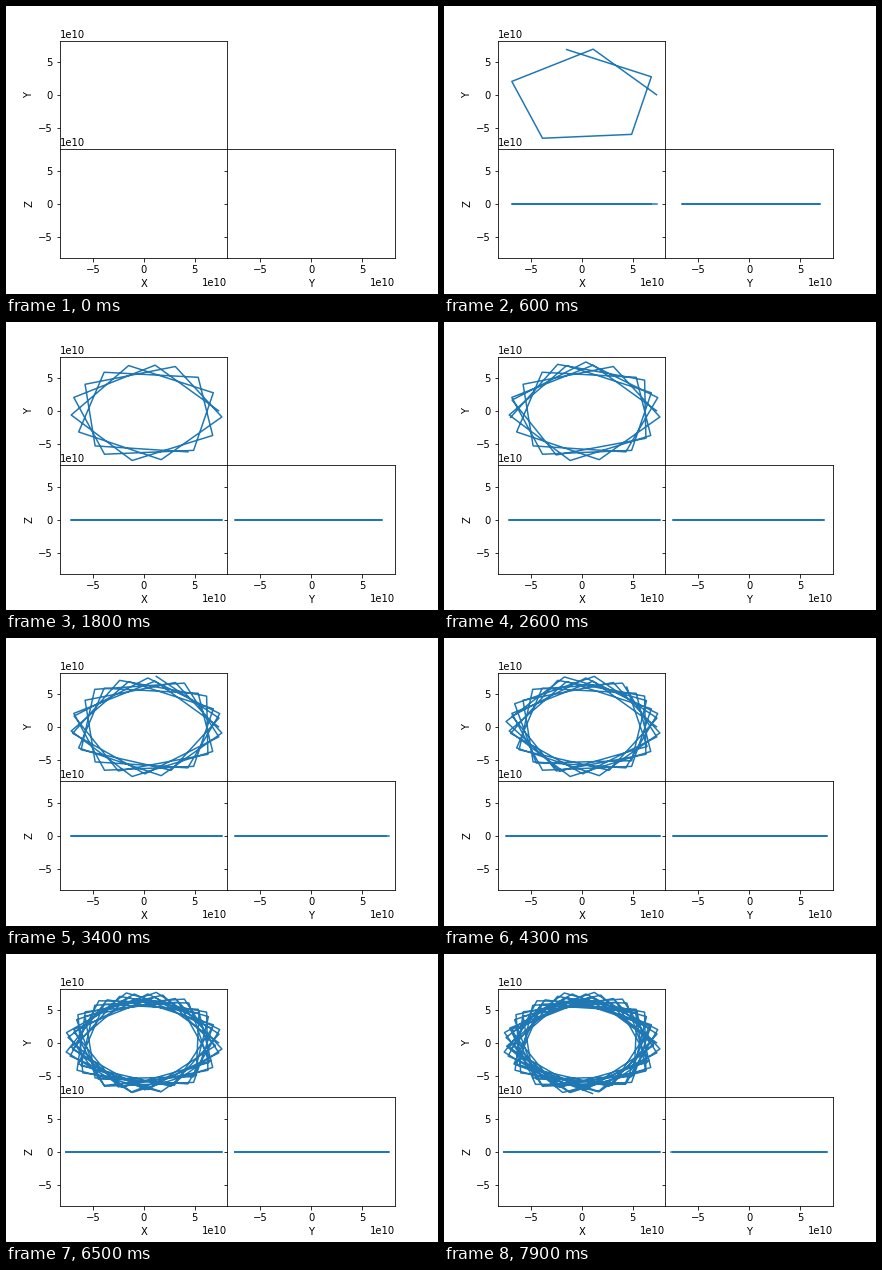
Recreate the animation shown at these times as a matplotlib script. Size 432 by 288 pixels, loop 8 s.

```python
import numpy as np
import matplotlib.pyplot as plt
from matplotlib.animation import FuncAnimation

STEPS = 80
LIMIT = 8.228e10

plt.rcParams.update({
    "font.family": "DejaVu Sans",
    "font.size": 10,
    "lines.linewidth": 1.5,
    "axes.linewidth": 0.8,
})


def orbit(steps):
    """Sampled, slowly precessing, nearly circular orbit in the XY plane."""
    radius, ecc = 0.8965 * LIMIT, 0.0505
    n = np.arange(steps)
    start = np.radians(-87)
    anomaly = start + np.radians(71.51) * n
    angle = (np.radians(0.2 + 76.331 * n)
             + 2 * ecc * (np.sin(anomaly) - np.sin(start)))
    r = radius * (1 - ecc * np.cos(anomaly))
    return r * np.cos(angle), r * np.sin(angle), np.zeros(steps)


x, y, z = orbit(STEPS)

fig, axes = plt.subplots(2, 2, sharex="col", sharey="row",
                         figsize=(6, 4), dpi=72, facecolor="white")
fig.subplots_adjust(left=0.125, right=0.9, bottom=0.125, top=0.88,
                    wspace=0, hspace=0)
axes[0, 1].remove()
ax_xy, ax_xz, ax_yz = axes[0, 0], axes[1, 0], axes[1, 1]

ax_xy.set_ylabel("Y")
ax_xz.set(xlabel="X", ylabel="Z")
ax_yz.set_xlabel("Y")

ticks = [-5e10, 0, 5e10]
views = []
for ax, u, v in ((ax_xy, x, y), (ax_xz, x, z), (ax_yz, y, z)):
    ax.set(xticks=ticks, yticks=ticks,
           xlim=(-LIMIT, LIMIT), ylim=(-LIMIT, LIMIT))
    line, = ax.plot([], [], color="C0")
    views.append((line, u, v))


def update(i):
    for line, u, v in views:
        if i:
            line.set_data(u[:i + 1], v[:i + 1])
        else:
            line.set_data([], [])
    return [line for line, _, _ in views]


anim = FuncAnimation(fig, update, frames=STEPS, interval=100,
                     repeat=True, repeat_delay=0, blit=False)
plt.show()
```
